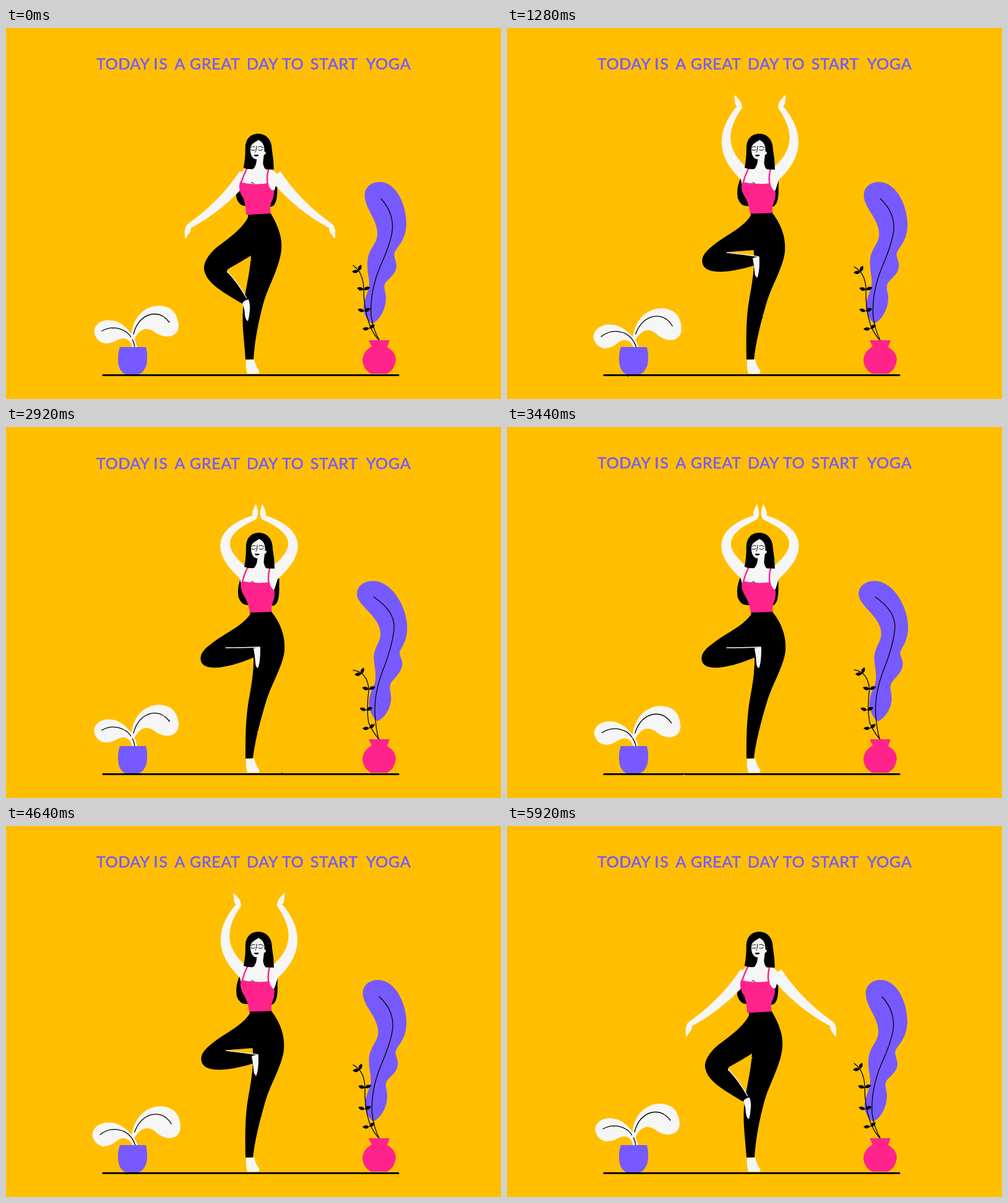
An HTML page for the animation above (5.96 s loop, 800 px wide and 600 px high).

```html
<!DOCTYPE html>
<html lang="en">
<head>
<meta charset="utf-8">
<title>Yoga</title>
<style>
  html, body { margin: 0; width: 100%; height: 100%; overflow: hidden; background: #ffbf00; }
  svg { display: block; width: 100%; height: 100%; }
  text { font: 25px Lato, sans-serif; letter-spacing: .7px; fill: #775aff; stroke: #775aff; stroke-width: .6; stroke-linejoin: round; }
  .white { fill: #f6f6f6; }
  .pink { fill: #ff238b; }
  .purple { fill: #775aff; }
  .line { fill: none; stroke: #000; stroke-width: 1.3; stroke-linecap: round; stroke-linejoin: round; }
</style>
</head>
<body>
<svg viewBox="0 0 800 600">
  <defs>
    <filter id="rough" x="0" y="0" width="800" height="600" filterUnits="userSpaceOnUse" color-interpolation-filters="sRGB">
      <feTurbulence id="noise" type="fractalNoise" baseFrequency=".18" numOctaves="2" result="n"/>
      <feDisplacementMap in="SourceGraphic" in2="n" scale="1.5" xChannelSelector="R" yChannelSelector="G"/>
    </filter>
    <path id="leaflet" d="M0 0Q5 -6 11 0Q5 5 0 0Z"/>
  </defs>

  <!-- right plant -->
  <path id="bigLeaf" class="purple"/>
  <path id="rib" class="line"/>
  <path id="sprig" class="line"/>
  <g id="leaflets"></g>
  <path class="pink" d="M586 505L620 505L616 516Q630 524 630 537Q628 553 616 559L590 559Q577 552 576 537Q577 523 591 515Z"/>

  <g filter="url(#rough)">
    <text id="title" y="67.5"><tspan x="146">TODAY</tspan><tspan x="238.5" letter-spacing="2">IS</tspan><tspan x="272.5">A</tspan><tspan x="297">GREAT</tspan><tspan x="389">DAY</tspan><tspan x="446">TO</tspan><tspan x="492">START</tspan><tspan x="582">YOGA</tspan></text>

    <!-- left plant -->
    <g id="leafLeft">
      <path class="white" d="M212 518Q211 508 205 498Q195 482 180 475Q162 469 150 477Q141 484 143 494Q147 508 160 510Q172 510 181 504Q192 499 199 506Q203 510 204 518Z"/>
      <path class="line" d="M155 490Q175 479 195 492Q206 501 208 516"/>
    </g>
    <g id="leafRight">
      <path class="white" d="M202 503Q202 480 215 464Q229 449 248 449Q268 450 275 465Q281 479 278 488Q273 500 258 499Q246 497 238 490Q219 479 207 504Z"/>
      <path class="line" d="M206 495Q213 468 235 463Q252 460 264 476"/>
    </g>
    <path class="purple" d="M184 516L226 516Q230 530 227 545Q223 557 215 560L193 560Q184 556 182 545Q179 530 184 516Z"/>

    <!-- figure -->
    <path id="backHair" d="M380 240Q371 258 374 275Q379 289 390 288L430 289Q440 287 440 262L440 245Z"/>
    <path id="armLeft" class="white"/>
    <path id="armRight" class="white"/>
    <path class="white" d="M390 227Q381 229 377 240L379 250L382 262L428 268L434 262L440 243Q437 230 424 227Z"/>
    <path id="top" class="pink"/>
    <path id="straps" class="line" style="stroke:#ff238b;stroke-width:2.5"/>
    <path class="line" d="M396 251L398 249.500L401 252" style="stroke-width:1"/>
    <path id="standingLeg"/>
    <path id="bentLeg"/>
    <path id="shinLine" class="line" style="stroke:#f6f6f6"/>
    <path id="foot" class="white"/>
    <path class="white" d="M388 537L401 536Q404 548 409 554Q411 559 406 559L390 559Q387 548 388 537Z"/>
    <g id="head">
      <path d="M408 171C394 171 387 181 387 194Q387 212 384 226Q390 229 400 228L433 229Q433 213 430 197C430 180 420 171 408 171Z"/>
      <path class="white" d="M408 181C403 185 395 187 395 196Q395 206 400 210.500Q403 213 405.500 212L404.500 219Q403 225 398 230L421 230Q416 225 415.500 218L417 205Q420 205 420 201Q419 199 417.500 200Q419 186 408 181Z"/>
      <path class="line" style="stroke-width:1" d="M396 193Q399 190.500 402 192M408 192Q412 190 416 193.500M396 197Q399 199.500 402 197M408 197Q412 199.500 415 196M405 191Q405 198 403 201"/>
      <path d="M400.500 206Q403 204 404.500 205Q407 204 409 206Q404.500 209.500 400.500 206Z"/>
    </g>
    <path class="line" style="stroke-width:3.2" d="M157 561.500L634 561.500"/>
  </g>
</svg>
<script>
const FRAME = 40, FRAMES = 149, LAST = 74;
const TAU = Math.PI * 2;
const el = id => document.getElementById(id);
const set = (id, name, value) => el(id).setAttribute(name, value);
const lerp = (a, b, k) => a + (b - a) * k;
const clamp = x => Math.min(1, Math.max(0, x));
const easeInOut = u => u < .5 ? 2 * u * u : 1 - 2 * (1 - u) ** 2;

// Blends two paths that share the same commands.
function morph([from, to], k) {
  const ends = to.match(/[\d.]+/g);
  let i = 0;
  return from.replace(/[\d.]+/g, v => lerp(+v, +ends[i++], k).toFixed(2));
}

const shapes = {
  bigLeaf: [
    'M604 249C588 249 578 260 580 274C582 295 602 312 600 336C598 352 584 358 584 382C584 400 589 408 586 422C580 440 574 452 581 466Q588 478 592 478C603 474 614 455 614 437C615 428 608 420 614 411C622 402 632 396 631 383C630 374 625 368 629 361C636 350 647 340 647 315C646 280 628 249 604 249Z',
    'M595 249C577 248 566 260 568 273C572 292 606 308 605 336C604 350 593 358 594 376C595 390 599 402 595 416C589 430 584 442 587 456Q593 473 600 476C612 470 622 455 622 438C622 428 617 420 623 412C630 403 640 396 640 382C640 374 633 368 637 361C642 352 650 340 648 318C645 285 622 250 595 249Z'],
  rib: [
    'M606 276Q628 300 624 330Q620 352 605 385Q588 425 590 465Q594 490 603 504',
    'M595 275Q629 298 627 326Q625 350 612 385Q594 428 596 465Q598 490 602 504'],
  sprig: [
    'M561 384Q577 395 578 420Q578 455 588 481Q594 496 603 505',
    'M561 393Q584 396 586 425Q582 455 586 478Q594 496 603 505'],
  top: [
    'M378 249Q400 255 423 251Q425 264 433 262Q434 272 428 284Q426 292 428 301Q410 305 388 302Q388 290 384 276Q374 262 378 249Z',
    'M381 249Q402 254 426 251Q427 264 434 264Q435 275 431 284Q428 292 430 300Q412 304 394 302Q393 288 386 275Q376 260 381 249Z'],
  straps: [
    'M389 228Q384 238 380 250M424 229Q420 245 424 257L430 265',
    'M390 228Q385 238 382 250M426 229Q422 245 426 257L432 266'],
  standingLeg: [
    'M391 302L428 300C440 320 447 340 445 358C443 385 425 415 416 445C408 475 402 505 400 536L387 536C385 505 381 480 383 455C386 425 394 400 396 368Z',
    'M395 300L429 299C443 316 452 338 450 362C447 388 429 415 420 445C410 478 402 510 399 536L387 536C387 505 387 480 391 450C395 425 401 400 400 368Z'],
  bentLeg: [
    'M393 302C384 325 355 343 338 357C322 372 318 385 321 394C326 414 352 428 382 446L389 438Q375 412 357 394Q357 390 362 388Q380 378 396 368L420 345Z',
    'M396 300C388 317 360 331 342 343C322 357 312 366 315 378C319 396 358 391 402 372L410 357Q382 357 354 357Q354 357 358 357Q380 357 410 357L430 345Z'],
  shinLine: ['M358 394Q375 412 389 437', 'M355 357Q382 357 410 356'],
  foot: [
    'M382 445Q385 440 392 439Q395 448 394 456Q393 468 391 474Q387 472 386 464Q386 455 382 445Z',
    'M400 358Q405 356 411 356Q411 370 410 378Q409 386 407 390Q403 388 403 380Q402 368 400 358Z']
};

// Each sprig joint: start x, y, end x, y, then the angles of its two leaflets.
const joints = [
  [570, 393, 574, 399, 175, -68],
  [578, 423, 586, 424, 195, -18],
  [579, 458, 582, 458, 198, -22],
  [587, 486, 587, 487, 178, -35]
];
const leaflets = joints.flatMap(([x0, y0, x1, y1, ...angles]) => angles.map(angle => {
  const node = document.createElementNS('http://www.w3.org/2000/svg', 'use');
  node.setAttribute('href', '#leaflet');
  el('leaflets').append(node);
  return { node, x0, y0, x1, y1, angle };
}));

const step = ([x, y], degrees, length) => {
  const a = degrees * TAU / 360;
  return [x + length * Math.cos(a), y + length * Math.sin(a)];
};

// Tapered outline around a curved arm with a short hand.
function armPath(lift, rise, mapX) {
  const shoulder = [386, 238];
  const elbow = step(shoulder, lerp(132, 239, lift), 61);
  const wrist = step(elbow, lerp(143, 320, rise), 62);
  const tip = step(wrist, lerp(107, 275, rise), 20);
  const bend = elbow.map((v, i) => 2 * v - (shoulder[i] + wrist[i]) / 2);
  const spine = [];
  for (let i = 0; i <= 20; i++) {
    const u = i / 20, v = 1 - u;
    const [x, y] = shoulder.map((s, j) => v * v * s + 2 * u * v * bend[j] + u * u * wrist[j]);
    spine.push([x, y, u < .5 ? lerp(10.5, 7.5, u * 2) : lerp(7.5, 4.2, u * 2 - 1)]);
  }
  for (let i = 1; i <= 5; i++) {
    const u = i / 5;
    spine.push([lerp(wrist[0], tip[0], u), lerp(wrist[1], tip[1], u), u < .5 ? 4.6 : lerp(7, 1, u)]);
  }
  const side = sign => spine.map(([x, y, w], i) => {
    const a = spine[Math.max(0, i - 1)], b = spine[Math.min(spine.length - 1, i + 1)];
    const dx = b[0] - a[0], dy = b[1] - a[1], d = Math.hypot(dx, dy) || 1;
    return [mapX(x - sign * w * dy / d).toFixed(2), (y + sign * w * dx / d).toFixed(2)];
  });
  return 'M' + [...side(1), ...side(-1).reverse()].join('L') + 'Z';
}

function draw(time) {
  // The loop plays forwards, then backwards.
  const frame = LAST - Math.abs(Math.floor(time / FRAME) % FRAMES - LAST);
  const ms = frame * FRAME;
  const beat = Math.floor(frame / 2);
  const boil = -Math.cos(TAU * .32 * beat);

  const rise = easeInOut(clamp(ms / 1800));
  const lift = lead => 1 - (1 - rise) ** lead;
  const sway = .5 - .55 * Math.cos(Math.PI * (ms - 350) / 2610);
  const droop = Math.sin(Math.PI * ms / 2960);

  const amount = { bigLeaf: sway, rib: sway, sprig: sway };
  for (const id in shapes) set(id, 'd', morph(shapes[id], amount[id] ?? rise));

  const shift = 3 * (1 - lift(4));
  set('armLeft', 'd', armPath(lift(3.6), rise, x => x));
  set('armRight', 'd', armPath(lift(4), rise, x => 818 - x + shift));

  for (const { node, x0, y0, x1, y1, angle } of leaflets)
    node.setAttribute('transform', `translate(${lerp(x0, x1, sway)} ${lerp(y0, y1, sway)}) rotate(${angle})`);
  set('leafLeft', 'transform', `rotate(${-10 * droop} 207 512)`);
  set('leafRight', 'transform', `rotate(${6 * droop} 207 512)`);

  set('title', 'transform', `translate(0 ${boil * .9})`);
  set('backHair', 'transform', `translate(${boil * 1.6} 0)`);
  set('head', 'transform', `translate(${.4 + boil * .6} 0)`);
  set('noise', 'seed', 1 + beat % 7);
}

let start;
function tick(now) {
  start ??= now;
  draw(now - start);
  requestAnimationFrame(tick);
}
draw(0);
requestAnimationFrame(tick);
</script>
</body>
</html>
```
